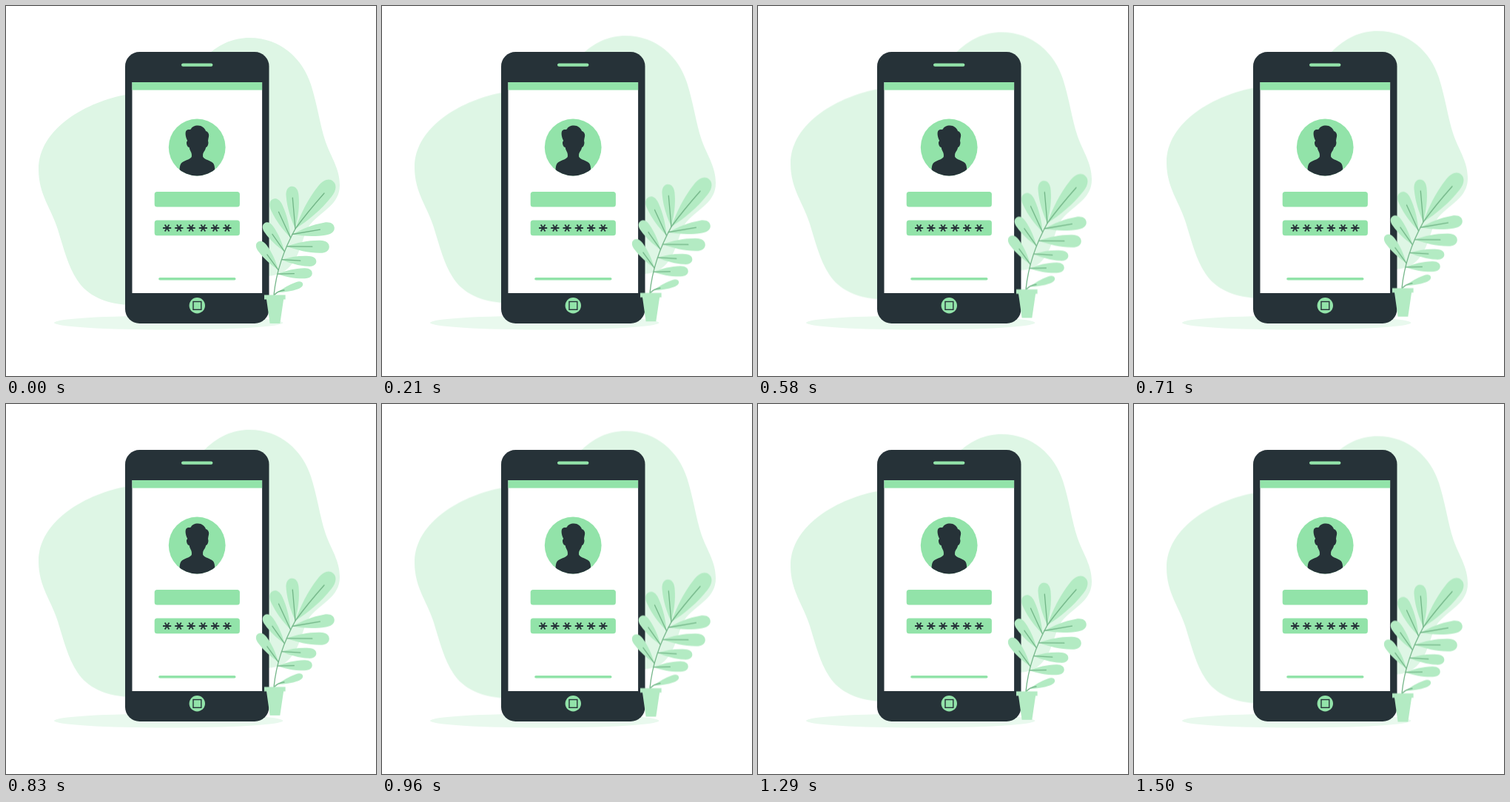
Write an HTML page that moves like this. It is 500 by 500 pixels and loops after 1.54 s.

```html
<!DOCTYPE html>
<html lang="en">
<head>
<meta charset="utf-8">
<title>Phone login</title>
<style>
  html, body { margin: 0; width: 100%; height: 100%; overflow: hidden; background: #fff; }
  svg { display: block; width: 100%; height: 100%; }
  .green { fill: #92e3a9; }
  .dark { fill: #263238; }
  .leaf { fill: #b3ebc3; }
  .vein { fill: none; stroke: #72b587; stroke-width: 1.3; stroke-linecap: round; }
  .float { animation: float 770ms linear -40ms infinite alternate; }
  @keyframes float {
    from { transform: translateY(0.5px); }
    to { transform: translateY(-9.5px); }
  }
</style>
</head>
<body>
<svg viewBox="0 0 500 500">
  <defs>
    <clipPath id="avatar"><circle cx="258.2" cy="191" r="38.4"/></clipPath>
    <path id="star" d="M-5.6 0H5.6M-2.9 -4.6L2.9 4.6M2.9 -4.6L-2.9 4.6"/>
  </defs>

  <ellipse cx="219.7" cy="428" rx="154.7" ry="9.5" fill="#e9f9ee"/>

  <path class="float" fill="#def6e5" d="M164 119.6C110 129 44 165 44 221C44 255 62 275 70 302
    C78 328 84 352 96 370C110 392 135 402 164 404L300 385L352 365
    C400 364 396 312 412 294C428 276 451 268 451 242C451 220 440 206 432 184
    C424 160 421 134 412 106C401 72 372 43 329 43C306 43 286 52 266 72L240 110Z"/>

  <rect class="dark" x="161" y="62" width="194.5" height="367" rx="19.5"/>
  <rect x="170.5" y="103" width="175.6" height="285" fill="#fff"/>
  <g class="green">
    <rect x="170.5" y="103" width="175.6" height="10.6"/>
    <rect x="237" y="77.4" width="42.4" height="4.4" rx="2.2"/>
    <circle cx="258.3" cy="404.8" r="10.7"/>
    <circle cx="258.2" cy="191" r="38.4"/>
    <rect x="200.7" y="251" width="115.2" height="20.5" rx="3.5"/>
    <rect x="200.7" y="289.6" width="115.2" height="20.6" rx="3.5"/>
    <rect x="206.2" y="367" width="104.3" height="3.6" rx="1.8"/>
  </g>
  <rect x="253" y="399.5" width="10.8" height="10.8" fill="none" stroke="#263238" stroke-width="1.4"/>

  <path class="dark" clip-path="url(#avatar)" d="M250.8 204C251.2 201 250.8 199 249.8 197
    C248.6 195 248 193 247.6 191C245 191 243.4 186 244.2 183.5L245.2 182
    C242.8 178 241.8 172 243.2 169C244.6 166.6 247.5 167.2 249.6 166.8
    C251.5 162.8 255.5 161.4 259.5 161.6C264.5 161.8 268.5 164.6 270 169
    C273.5 170 274.8 173.5 273.9 177C273.4 179 273.2 180.5 273 182.5
    C274.2 185 272.8 190.5 270.2 191C269.6 193.6 268.8 195.4 267.4 197
    C266.2 199 265.8 201 266.2 204C268.5 208 277 208.8 280 212.5
    C282 215 282.4 219 282.5 232H234.3C234.4 219 234.8 215 236.8 212.5C239.8 208.8 248.3 208 250.8 204Z"/>

  <g id="stars" stroke="#263238" stroke-width="1.8"></g>

  <g class="float">
    <g id="leaves"></g>
    <path class="vein" d="M362 390.5Q366.5 345.5 391 301Q407 279 430 253"/>
    <path class="vein" d="M362.5 390.5Q367 385 376 384"/>
    <path class="leaf" d="M349 390.5H377.6V396.5H375.1L370.3 429H356.6L352 396.5H349Z"/>
  </g>
</svg>

<script>
function add(id, tag, attrs) {
  const el = document.createElementNS('http://www.w3.org/2000/svg', tag);
  for (const key in attrs) el.setAttribute(key, attrs[key]);
  document.getElementById(id).append(el);
}

// A teardrop growing from (x, y); vein is the share of its length that is lined.
function leaf(x, y, angle, len, width, vein = 0) {
  const h = width / 2;
  const [a, b, c, d] = [0.25, 0.5, 0.78, 0.93].map(k => k * len);
  const transform = `translate(${x} ${y}) rotate(${angle})`;
  add('leaves', 'path', {
    class: 'leaf',
    transform,
    d: `M0 0C${a} ${-h * 0.6} ${b} ${-h} ${c} ${-h}C${d} ${-h} ${len} ${-h * 0.55} ${len} 0
        C${len} ${h * 0.55} ${d} ${h} ${c} ${h}C${b} ${h} ${a} ${h * 0.6} 0 0Z`
  });
  if (vein) add('leaves', 'path', { class: 'vein', transform, d: `M0 0H${vein * len}` });
}

// The lower stem is a parabola rising from the pot.
function stemX(y) {
  const up = 390 - y;
  return 362 + 0.101 * up + 0.00252 * up * up;
}

// Four leaves per side, lower ones smaller and set further apart.
for (let i = 0; i < 4; i++) {
  const [len, width] = i < 2 ? [57.5, 17] : [47, 14];
  const left = 301 + 9 * i + 3.2 * i * i;
  const right = 308.5 + 15.5 * i + 0.8 * i * i;
  leaf(stemX(left), left, -95 - 24.5 * i + 4.7 * i * i, len, width, 0.73 - 0.06 * i);
  leaf(stemX(right), right, -9.6 + 14 * i - 3.75 * i * i, len, width, 0.66 - 0.06 * i);
}
leaf(391, 301, -51.7, 82, 23);
leaf(367, 387, -19.4, 36, 9.5);

for (let i = 0; i < 6; i++) {
  add('stars', 'use', { href: '#star', x: 217.6 + i * 16.25, y: 300 });
}
</script>
</body>
</html>
```
